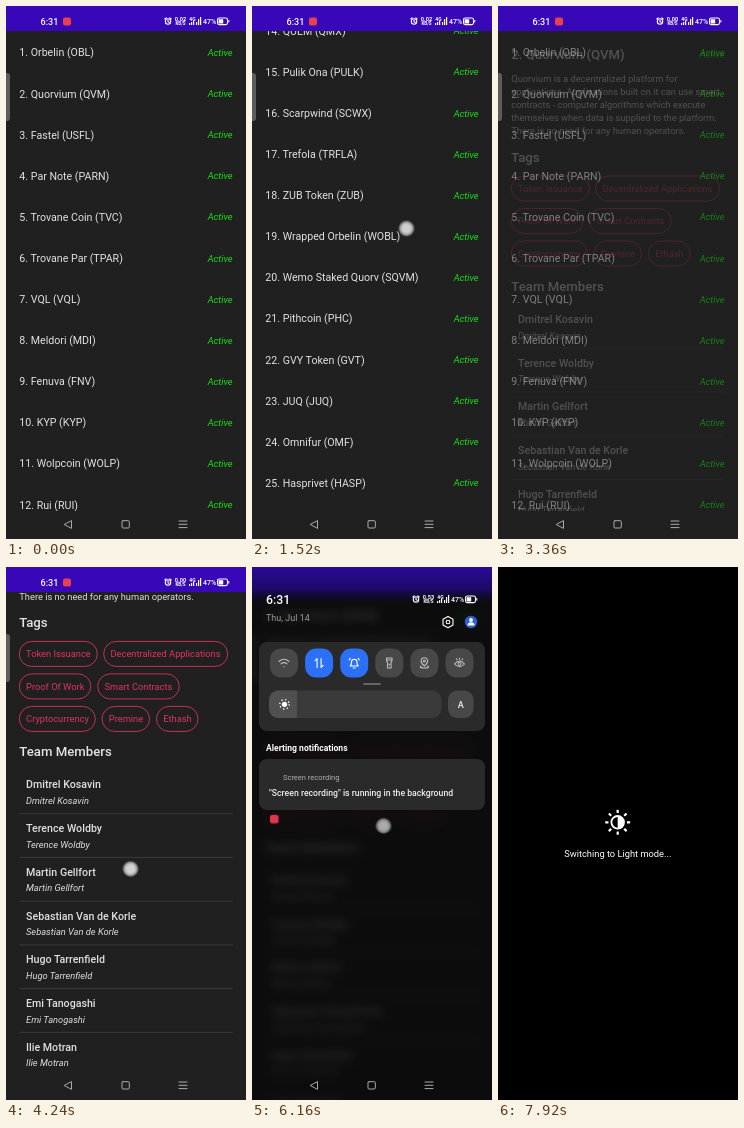
Recreate the animation shown at these times as an HTML page. Size 240 by 533 pixels, loop 8 s.

```html
<!DOCTYPE html>
<html lang="en">
<head>
<meta charset="utf-8">
<title>Coin list app</title>
<style>
html, body { margin: 0; width: 100%; height: 100%; overflow: hidden; background: #000; }
svg { display: block; width: 100vw; height: 100vh; font-family: Roboto, "Noto Sans", sans-serif; }
.coin { font-size: 10.65px; fill: #e2e2e2; }
.active { font-size: 9.3px; font-style: italic; fill: #14e214; text-anchor: end; }
.head { font-size: 13.2px; font-weight: 500; fill: #e4e4e4; }
.body { font-size: 9.3px; fill: #e0e0e0; }
.chip { font-size: 9.3px; fill: #e0365f; }
.name { font-size: 10.65px; font-weight: 500; fill: #e0e0e0; }
.role { font-size: 9.3px; font-style: italic; fill: #e0e0e0; }
.line { stroke: #fff; fill: none; stroke-width: 1.1; stroke-linecap: round; stroke-linejoin: round; }
.tiny { font-size: 5.6px; font-weight: 700; fill: #fff; text-anchor: middle; }
.label { font-size: 7px; fill: #ccc; text-anchor: middle; }

/* One percent of the loop is 80 ms. */
.anim { animation: 8s linear infinite both; }
#list { animation-name: list-scroll; }
#listPage { animation-name: list-page; }
#detail { animation-name: detail-scroll; }
#detailPage { animation-name: detail-page; }
#app { animation-name: app-blur; }
#statusBar { animation-name: status-bar; }
#rateA { animation-name: rate-a; animation-timing-function: step-end; }
#rateB { animation-name: rate-b; animation-timing-function: step-end; }
#shade { animation-name: shade; }
#mini { animation-name: mini; }
#full { animation-name: full; }
#recIcon { animation-name: rec-icon; }
#switching { animation-name: switching; }
#switchInfo { animation-name: switch-info; }
#ripple { animation-name: ripple; }
#touch { animation-name: touch; }

@keyframes list-scroll {
  0%, 10% { transform: translateY(0); }
  13% { transform: translateY(-200px); }
  15% { transform: translateY(-320px); }
  19%, 21% { transform: translateY(-556px); }
  24% { transform: translateY(-240px); }
  26% { transform: translateY(-90px); }
  27.8%, 100% { transform: translateY(0); }
}
@keyframes list-page {
  0%, 40% { opacity: 1; }
  44%, 100% { opacity: 0; }
}
@keyframes detail-page {
  0%, 41% { opacity: 0; }
  45%, 100% { opacity: 1; }
}
@keyframes detail-scroll {
  0%, 51% { transform: translateY(0); }
  53% { transform: translateY(-95px); }
  54.5% { transform: translateY(-165px); }
  57% { transform: translateY(-215px); }
  60%, 64.5% { transform: translateY(-333px); }
  67.5% { transform: translateY(-110px); }
  70%, 100% { transform: translateY(0); }
}
@keyframes app-blur {
  0%, 73.5% { filter: blur(0); }
  77%, 100% { filter: blur(5px); }
}
@keyframes status-bar {
  0%, 73.5% { opacity: 1; }
  75%, 100% { opacity: 0; }
}
@keyframes rate-a { 0% { opacity: 1; } 23%, 100% { opacity: 0; } }
@keyframes rate-b { 0% { opacity: 0; } 23%, 100% { opacity: 1; } }
@keyframes shade {
  0%, 73.5% { opacity: 0; }
  76.5%, 100% { opacity: 1; }
}
@keyframes mini {
  0%, 73.5% { transform: translateY(-40px); opacity: 1; }
  77%, 83% { transform: translateY(0); opacity: 1; }
  86%, 100% { transform: translateY(60px); opacity: 0; }
}
@keyframes full {
  0%, 83% { transform: translateY(-30px); opacity: 0; }
  88%, 100% { transform: translateY(0); opacity: 1; }
}
@keyframes rec-icon {
  0%, 77% { transform: translateY(42px); }
  81%, 100% { transform: translateY(0); }
}
@keyframes switching {
  0%, 93.5% { opacity: 0; }
  96%, 100% { opacity: 1; }
}
@keyframes switch-info {
  0%, 95.5% { opacity: 0; }
  98.5%, 100% { opacity: 1; }
}
@keyframes ripple {
  0%, 38.9% { opacity: 0; transform: scaleX(.2); }
  39.5% { opacity: .12; }
  41%, 100% { opacity: 0; transform: scaleX(1); }
}
@keyframes touch {
  0%, 9.6% { transform: translate(140px, 430px); opacity: 0; }
  10% { transform: translate(140px, 430px); opacity: 1; }
  13% { transform: translate(150px, 230px); opacity: 1; }
  14% { transform: translate(150px, 225px); opacity: 0; }
  14.5% { transform: translate(142px, 455px); opacity: 0; }
  15% { transform: translate(142px, 450px); opacity: 1; }
  19% { transform: translate(154.5px, 222.5px); opacity: 1; }
  20.5% { transform: translate(154.5px, 222.5px); opacity: 0; }
  20.8% { transform: translate(130px, 200px); opacity: 0; }
  21.2% { transform: translate(130px, 200px); opacity: 1; }
  24% { transform: translate(118px, 512px); opacity: 1; }
  25% { transform: translate(118px, 512px); opacity: 0; }
  25.2% { transform: translate(125px, 260px); opacity: 0; }
  25.6% { transform: translate(125px, 260px); opacity: 1; }
  27.3% { transform: translate(113px, 461px); opacity: .9; }
  28% { transform: translate(113px, 461px); opacity: .4; }
  29% { transform: translate(113px, 461px); opacity: 0; }
  38.6% { transform: translate(100px, 88px); opacity: 0; }
  39%, 40% { transform: translate(100px, 88px); opacity: 1; }
  42% { transform: translate(100px, 88px); opacity: 0; }
  50.5% { transform: translate(124px, 398px); opacity: 0; }
  51% { transform: translate(124px, 398px); opacity: 1; }
  53% { transform: translate(124.5px, 302.5px); opacity: 1; }
  54.5% { transform: translate(126px, 233px); opacity: 1; }
  55.5% { transform: translate(126px, 228px); opacity: 0; }
  56.5% { transform: translate(124px, 429px); opacity: 0; }
  57% { transform: translate(124px, 429px); opacity: 1; }
  60% { transform: translate(125.5px, 310px); opacity: 1; }
  61% { transform: translate(125.5px, 310px); opacity: 0; }
  61.5% { transform: translate(164.5px, 228.5px); opacity: 0; }
  63%, 64.5% { transform: translate(164.5px, 228.5px); opacity: 1; }
  67.5% { transform: translate(119px, 451px); opacity: 1; }
  70% { transform: translate(119px, 451px); opacity: .8; }
  72% { transform: translate(119px, 451px); opacity: 0; }
  73.4% { transform: translate(128px, 4px); opacity: 0; }
  73.8% { transform: translate(128px, 6px); opacity: 1; }
  77% { transform: translate(131.5px, 258px); opacity: .8; }
  79% { transform: translate(132px, 390px); opacity: .8; }
  81% { transform: translate(132px, 400px); opacity: 0; }
  82.4% { transform: translate(122px, 160px); opacity: 0; }
  83% { transform: translate(122px, 160px); opacity: .8; }
  86.5% { transform: translate(124px, 400px); opacity: .8; }
  88% { transform: translate(124px, 400px); opacity: 0; }
  92% { transform: translate(147px, 166px); opacity: 0; }
  93%, 94% { transform: translate(147px, 166px); opacity: .8; }
  95%, 100% { transform: translate(147px, 166px); opacity: 0; }
}
</style>
</head>
<body>
<svg viewBox="0 0 240 533">
  <defs>
    <radialGradient id="dot">
      <stop offset=".45" stop-color="#d2d2d2"/>
      <stop offset=".65" stop-color="#b8b8b8"/>
      <stop offset=".82" stop-color="#888"/>
      <stop offset="1" stop-color="#666" stop-opacity=".2"/>
    </radialGradient>
    <linearGradient id="dusk" x2="0" y2="1">
      <stop stop-color="#2b0a98"/>
      <stop offset=".55" stop-color="#1c0a66"/>
      <stop offset="1" stop-color="#0a0a0c" stop-opacity="0"/>
    </linearGradient>
    <g id="icons">
      <g class="line">
        <circle cx="162" cy="15.5" r="2.7"/>
        <path d="M162 14v1.7l1.1.6M158.8 13l1.4-1.2M165.2 13l-1.4-1.2"/>
      </g>
      <text class="tiny" x="174.5" y="19.4" style="font-size:4.5px">KB/S</text>
      <text class="tiny" x="186.5" y="14.8" style="font-size:5px">4G</text>
      <path d="M183 19v-2h1.2v2zm2 0v-3h1.2v3zm2 0v-4h1.2v4zm3 0v-3h1.2v3zm2 0v-6h1.2v6zm2 0v-8h1.2v8z" fill="#fff"/>
      <text x="197" y="18" font-size="7" font-weight="500" fill="#fff">47%</text>
      <rect x="211.5" y="12" width="10" height="6.6" rx="1.8" class="line"/>
      <path d="M212.6 13.2h4.6v4.200h-4.600zM222.300 14h1v2.600h-1z" fill="#fff"/>
    </g>
    <g id="wifi" class="line"><path d="M-5-1.5q5-4.5 10 0M-3 .9q3-2.6 6 0M0 3.6v.2"/></g>
    <g id="data" class="line"><path d="M-2 4.5v-9l-2 2.2M2-4.5v9l2-2.2"/></g>
    <g id="bell" class="line"><path d="M-4 3q1.3-1.2 1.3-4a2.7 2.7 0 0 1 5.4 0q0 2.8 1.3 4zM-1 5h2M-5-3l1-1.6M5-3l-1-1.6"/></g>
    <g id="torch" class="line"><path d="M-2.7-5h5.4v3l-1 1.4V5h-3.4v-5.6l-1-1.4zM-2.7-3h5.4M0 1v1"/></g>
    <g id="pin" class="line"><path d="M0 3q-3.3-3-3.3-5a3.3 3.3 0 0 1 6.6 0q0 2-3.3 5zM-3.5 3q-2 2 3.5 2t3.5-2"/><circle cy="-2" r="1"/></g>
    <g id="eye" class="line"><path d="M-5 1q5-6 10 0q-5 5.5-10 0zM0-5v1.2M-3-4.3l.5 1M3-4.3l-.5 1"/><circle cy="1" r="1.5"/></g>
    <g id="half" class="line"><circle r="4"/><path d="M0-4a4 4 0 0 1 0 8z" fill="#fff"/></g>
  </defs>

  <rect width="240" height="533" fill="#202020"/>
  <g id="app" class="anim">
    <rect width="240" height="533" fill="#202020"/>
    <g id="listPage" class="anim">
      <g id="list" class="anim"></g>
      <g transform="translate(100 88)"><rect id="ripple" class="anim" x="-100" y="-20" width="240" height="41" fill="#fff"/></g>
    </g>
    <g id="detailPage" class="anim"><g id="detail" class="anim"></g></g>
    <rect width="240" height="25" fill="#3808b8"/>
    <rect y="505" width="240" height="28" fill="#202020"/>
    <rect x="-3" y="67" width="7" height="48" rx="3" fill="#5c5c5c"/>
  </g>

  <g id="statusBar" class="anim">
    <text x="34.5" y="18.7" font-size="9.1" font-weight="500" fill="#fff">6:31</text>
    <rect x="57" y="11.5" width="8" height="8" rx="2" fill="#e8404e"/>
    <use href="#icons"/>
    <text id="rateA" class="tiny anim" x="174.5" y="15">0.02</text>
    <text id="rateB" class="tiny anim" x="174.5" y="15">0.00</text>
  </g>

  <g id="shade" class="anim">
    <rect width="240" height="533" fill="#080808" fill-opacity=".79"/>
    <rect width="240" height="40" fill="url(#dusk)"/>
    <text x="14" y="36.5" font-size="12.3" font-weight="500" fill="#fff">6:31</text>
    <text x="14" y="53.5" font-size="9" fill="#999">Thu, Jul 14</text>
    <g transform="translate(2 17)">
      <use href="#icons"/>
      <text class="tiny" x="174.5" y="15">0.53</text>
    </g>
    <g class="line"><path d="M196 49.5l5 2.8v5.6l-5 2.8l-5-2.8v-5.6z"/><circle cx="196" cy="55" r="1.8"/></g>
    <circle cx="219" cy="55" r="6.2" fill="#2f5fd0"/>
    <path d="M215.5 58.5a3.5 3.2 0 0 1 7 0z" fill="#fff"/><circle cx="219" cy="53" r="1.9" fill="#fff"/>

    <g id="mini" class="anim">
      <rect x="7" y="75" width="226" height="89" rx="8" fill="#2a2a2a"/>
      <g id="miniTiles"></g>
      <rect x="111" y="116" width="18" height="2" rx="1" fill="#666"/>
      <g id="slider">
        <rect x="17" y="123.5" width="172.5" height="27.5" rx="9" fill="#3a3a3a"/>
        <path d="M45 123.5H26a9 9 0 0 0-9 9v9.5a9 9 0 0 0 9 9H45z" fill="#505050"/>
        <circle cx="32.5" cy="137.3" r="2.6" fill="#fff"/>
        <circle cx="32.5" cy="137.3" r="4.7" fill="none" stroke="#fff" stroke-width="1.3" stroke-dasharray="1.3 2.39"/>
        <rect x="196" y="123.5" width="25.5" height="27.5" rx="9" fill="#484848"/>
        <text x="208.8" y="140.7" font-size="9" font-weight="700" fill="#ddd" text-anchor="middle">A</text>
      </g>
      <text x="14" y="184" font-size="8.6" font-weight="700" fill="#fff">Alerting notifications</text>
      <rect x="7" y="192" width="226" height="51" rx="8" fill="#2a2a2a"/>
      <text x="31" y="212.5" font-size="7.5" fill="#b0b0b0">Screen recording</text>
      <text x="17" y="229" font-size="8.7" font-weight="500" fill="#eee">"Screen recording" is running in the background</text>
      <rect id="recIcon" class="anim" x="18" y="206" width="8.5" height="8.5" rx="2" fill="#e0354a"/>
    </g>

    <g id="full" class="anim">
      <rect x="7" y="75" width="226" height="318" rx="8" fill="#2a2a2a"/>
      <g id="fullTiles"></g>
      <use href="#slider" y="226"/>
    </g>
  </g>

  <g class="line" style="stroke:#aaa; stroke-width:1">
    <path d="M58.5 518.3l7-3.7v7.4z"/>
    <rect x="116" y="514.7" width="7.3" height="7.3" rx="1"/>
    <path d="M173 515h8M173 518.3h8M173 521.6h8"/>
  </g>

  <g id="switching" class="anim">
    <rect width="240" height="533"/>
    <g id="switchInfo" class="anim">
      <g transform="translate(119.7 255.3)" fill="#fff">
        <circle r="6.3" fill="none" stroke="#fff" stroke-width="1.8"/>
        <path d="M0-6a6 6 0 0 1 0 12z"/>
        <g id="rays"></g>
      </g>
      <text x="119.8" y="290.3" font-size="9.3" fill="#fff" text-anchor="middle">Switching to Light mode...</text>
    </g>
  </g>
  <circle id="touch" class="anim" r="8.3" fill="url(#dot)"/>
</svg>

<script>
const fill = (id, markup) => document.getElementById(id).innerHTML = markup;
const text = (x, y, cls, words) => `<text x="${x}" y="${y}" class="${cls}">${words}</text>`;

const coins = `Orbelin (OBL)|Quorvium (QVM)|Fastel (USFL)|Par Note (PARN)|Trovane Coin (TVC)|Trovane Par (TPAR)|VQL (VQL)|Meldori (MDI)|Fenuva (FNV)|KYP (KYP)|Wolpcoin (WOLP)|Rui (RUI)|Drellik (DRK)|QUEM (QMX)|Pulik Ona (PULK)|Scarpwind (SCWX)|Trefola (TRFLA)|ZUB Token (ZUB)|Wrapped Orbelin (WOBL)|Wemo Staked Quorv (SQVM)|Pithcoin (PHC)|GVY Token (GVT)|JUQ (JUQ)|Omnifur (OMF)|Hasprivet (HASP)`.split("|");
fill("list", coins.map((coin, i) => {
  const y = 50.4 + i * 41.1;
  return text(13.3, y, "coin", `${i + 1}. ${coin}`) + text(226.5, y - .4, "active", "Active");
}).join(""));

const about = [
  "Quorvium is a decentralized platform for",
  "applications. Applications built on it can use smart",
  "contracts - computer algorithms which execute",
  "themselves when data is supplied to the platform.",
  "There is no need for any human operators."
];
const chips = [
  [13.3, 0, 78, "Token Issuance"], [97.7, 0, 124, "Decentralized Applications"],
  [13.3, 1, 71.5, "Proof Of Work"], [91.7, 1, 81.5, "Smart Contracts"],
  [13.3, 2, 76, "Cryptocurrency"], [96, 2, 47.5, "Premine"], [150.5, 2, 41.5, "Ethash"]
];
const team = `Dmitrel Kosavin|Terence Woldby|Martin Gellfort|Sebastian Van de Korle|Hugo Tarrenfield|Emi Tanogashi|Ilie Motran|Theo Marvic|Nathan Prowl|Satoru Umeki|Caio Veldas|Bert Holmrich`.split("|");

fill("detail",
  text(13.3, 53, "head", "2. Quorvium (QVM)") + text(226.5, 52, "active", "Active") +
  about.map((line, i) => text(13.3, 75.5 + i * 13.2, "body", line)).join("") +
  text(13.3, 156, "head", "Tags") +
  chips.map(([x, row, width, tag]) => {
    const y = 170 + row * 32.5;
    return `<rect x="${x}" y="${y}" width="${width}" height="25" rx="12.5" fill="none" stroke="#d8335c" stroke-width=".9"/>` +
      text(x + 6.8, y + 15.9, "chip", tag);
  }).join("") +
  text(13.3, 285, "head", "Team Members") +
  team.map((name, i) => {
    const y = 317 + i * 43.72;
    return text(20, y, "name", name) + text(20, y + 15.5, "role", name) +
      `<path d="M13.3 ${y + 25.3}H226.7" stroke="#424242" stroke-width=".8"/>`;
  }).join(""));

const tile = (x, y, icon, on) =>
  `<g transform="translate(${x} ${y})"><rect x="-14" y="-14.5" width="28" height="29" rx="11" fill="${on ? "#2b70f6" : "#484848"}"/>` +
  `<use href="#${icon}" opacity="${on ? 1 : .65}"/></g>`;
const glyphs = ["wifi", "data", "bell", "torch", "pin", "eye"];
fill("miniTiles", glyphs.map((icon, i) => tile(32 + i * 35.1, 96, icon, i === 1 || i === 2)).join(""));

const toggles = [
  ["wifi", "Wi-Fi"], ["data", "Mobile data", 1], ["bell", "Ring", 1], ["torch", "Flashlight"],
  ["pin", "Location"], ["eye", "Eye comfort"], ["half", "Dark mode", 1], ["wifi", "Hotspot"],
  ["data", "Auto-rotate"], ["bell", "Silent"], ["pin", "Airplane"], ["eye", "Screen cast"],
  ["torch", "Battery"], ["half", "Focus"], ["wifi", "Share"], ["data", "Sync"]
];
fill("fullTiles", toggles.map(([icon, label, on], i) => {
  const x = 40 + i % 4 * 53.4, y = 104 + Math.floor(i / 4) * 62;
  return tile(x, y, icon, on) + text(x, y + 25, "label", label);
}).join(""));

fill("rays", Array.from({ length: 8 }, (_, i) =>
  `<rect x="-1.1" y="-12.5" width="2.2" height="3.3" rx=".4" transform="rotate(${i * 45})"/>`).join(""));
</script>
</body>
</html>
```
